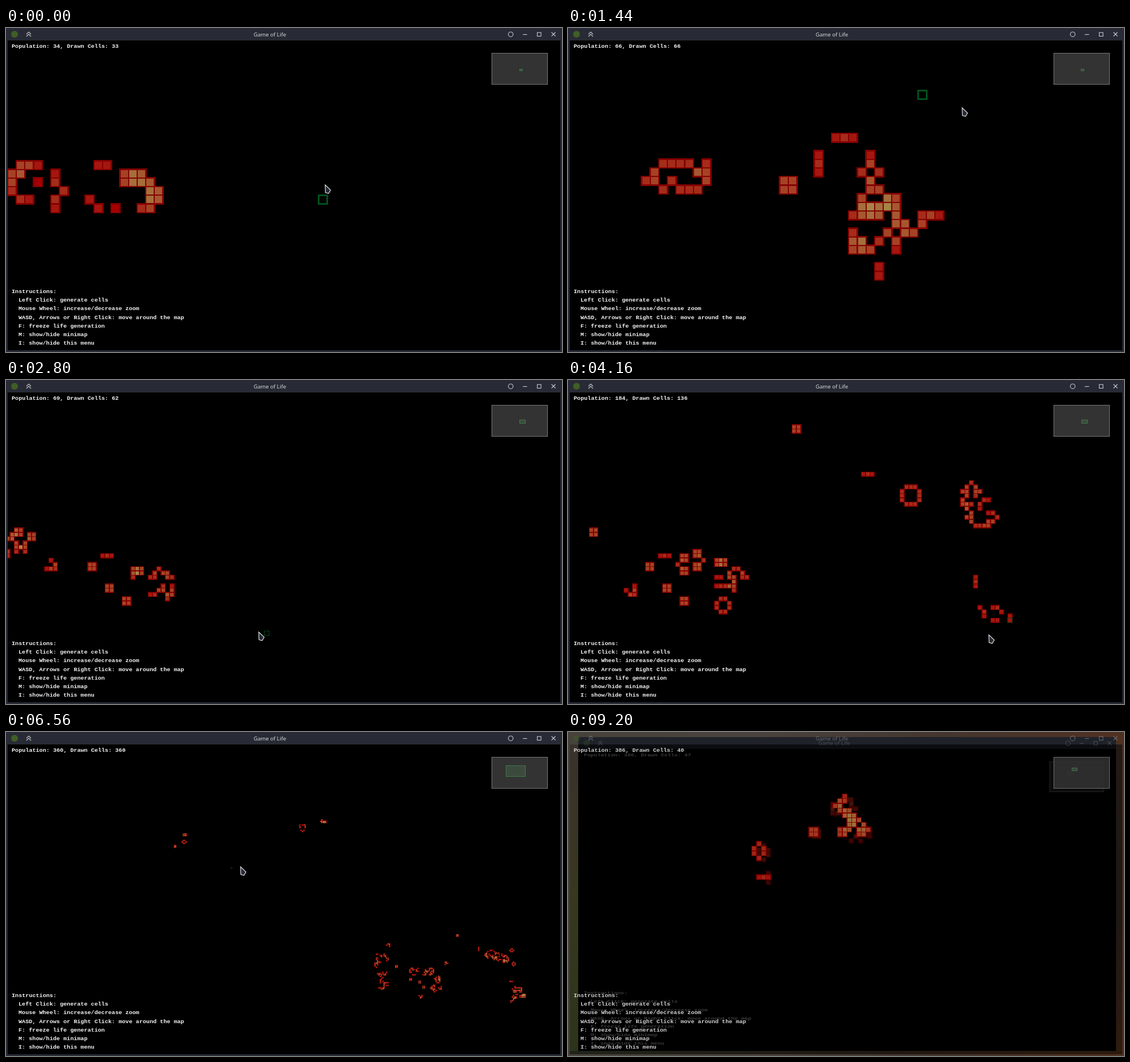
These frames come from a looping animation (979 by 572 pixels, 9280 ms). An HTML page with a canvas:

```html
<!DOCTYPE html>
<html lang="en">
<head>
<meta charset="utf-8">
<title>Game of Life</title>
<style>
html, body { margin: 0; width: 100%; height: 100%; overflow: hidden; background: #000; }
canvas { display: block; }
</style>
</head>
<body>
<canvas id="stage" width="979" height="572"></canvas>
<script>
const ctx = document.getElementById('stage').getContext('2d');
const STEP = 80, LOOP = 9280, LAST = LOOP - STEP;

// --- Life ---
const id = (x, y) => (y + 2048) * 4096 + x + 2048;
const cellX = k => k % 4096 - 2048;
const cellY = k => Math.floor(k / 4096) - 2048;
const AROUND = [-4097, -4096, -4095, -1, 1, 4095, 4096, 4097];

function nextGen(cells) {
  const count = new Map(), out = new Set();
  for (const k of cells) for (const d of AROUND) count.set(k + d, (count.get(k + d) || 0) + 1);
  for (const [k, n] of count) if (n === 3 || (n === 2 && cells.has(k))) out.add(k);
  return out;
}

function evolve(cells, n) {
  for (let i = 0; i < n; i++) cells = nextGen(cells);
  return cells;
}

const BLOCK = 'OO/OO', ROW = 'OOO', COLUMN = 'O/O/O';

function put(cells, x, y, shape) {
  shape.split('/').forEach((row, j) => {
    [...row].forEach((ch, i) => { if (ch === 'O') cells.add(id(x + i, y + j)); });
  });
}

let seed = 7;
const random = () => (seed = seed * 16807 % 2147483647) / 2147483647;

// Random cells in a round brush dragged along a line.
function scribble(cells, x1, y1, x2, y2, r) {
  const n = Math.ceil(Math.hypot(x2 - x1, y2 - y1) * r * 2);
  for (let i = 0; i < n; i++) {
    const k = i / n, a = random() * 2 * Math.PI, d = random() * r;
    cells.add(id(Math.round(x1 + (x2 - x1) * k + d * Math.cos(a)), Math.round(y1 + (y2 - y1) * k + d * Math.sin(a))));
  }
}

// What the user draws, by time; everything else grows from it.
const PAINT = {
  0(c) {
    put(c, -2, 5, '.OOO......OO/OO...O.......OOO/O..O.O.......OOOO/O.....O.........OO/.OO..O...O......OO/.....O....O.O..OO');
  },
  1440(c) {
    c.clear();
    put(c, -3, 6, '..OOOO.O/.O....OO/OO.O...O/..O.OOO');
    put(c, 13, 8, BLOCK);
    put(c, 19, 3, ROW);
    put(c, 17, 5, COLUMN);
    put(c, 21, 5, '..O/..O/.O.O/..O/..OO/.O..OO/.OOOOO/OOOO.O..OOO/.....OO.O/O...O.OO/OO.O.O/OOO..O//...O/...O');
  },
  3200(c) { put(c, 47, -24, BLOCK); },
  3280(c) { put(c, 63, -13, ROW); },
  4160(c) {
    put(c, 72, -10, '.OOO/O...O/O...O/O...O/.OOO');
    put(c, 86, -11, '..O/.O.O/OO.OO/.O.O/O....OO/OOO.O/.O..O/..O...OO/.OO.....O/..O...OO/...OOOO');
    put(c, 89, 11, COLUMN);
    put(c, 90, 18, 'O..OO/.O...O/.O.....O/...OO..O');
  },
  6240(c) {
    scribble(c, -179, -91, -163, -99, 3);
    scribble(c, -74, -107, -70, -107, 3);
    scribble(c, -57, -114, -50, -114, 3);
  },
  8240(c) {
    c.clear();
    put(c, -158, -103, '.OOO/.OOO/O...OO/O.O.OO/.O..OO/..OO');
    put(c, -161, -99, BLOCK);
    put(c, -166, -97, BLOCK);
    put(c, -178, -94, '.O/O.O/O.O/.O');
    put(c, -176, -88, COLUMN);
  }
};

const generation = t => Math.floor(t / 62.5 + 0.18);

function simulate() {
  const frames = [];
  let cells = new Set();
  for (let t = 0; t < LOOP; t += STEP) {
    cells = new Set(evolve(cells, generation(t) - generation(t - STEP)));
    if (PAINT[t]) PAINT[t](cells);
    frames.push(cells);
  }
  return frames;
}
const FRAMES = simulate();

// --- Motion: cell 0,0 on screen, pointer tip, aim relative to the tip, counters ---
const KEYS = [
  { t: 0, pitch: 15.2, origin: [40.9, 166], tip: [562, 277], aim: [-4, 26], count: [34, 33] },
  { t: 1440, pitch: 15.2, origin: [182.7, 148.2], tip: [694, 141], aim: [-71, -24], count: [66, 66] },
  { t: 2800, pitch: 7.6, origin: [48.8, 264.9], tip: [445, 445], aim: [14, 2], count: [69, 62] },
  { t: 4160, pitch: 7.6, origin: [41.2, 264.9], tip: [741, 450], aim: [37, -26], count: [184, 136] },
  { t: 6560, pitch: 2.28, origin: [686.4, 412.9], tip: [413, 238], aim: [-16, 2], count: [360, 360] },
  { t: 8240, pitch: 8.38, origin: [1819.5, 985.1], tip: [495, 305], aim: [17, 9], count: [385, 35] },
  { t: 9200, pitch: 8.38, origin: [1819.5, 985.1], tip: [960, 8], aim: [17, 9], count: [386, 40] }
];
const MIDDLE = [489.5, 295];
const mix = (a, b, k) => a + (b - a) * k;
const mixPair = (a, b, k) => a.map((v, i) => mix(v, b[i], k));
const center = key => key.origin.map((o, i) => (MIDDLE[i] - o) / key.pitch);

function ease(k) {
  const s = Math.min(1, Math.max(0, (k - 0.05) / 0.6));
  return s * s * (3 - 2 * s);
}

function poseAt(t) {
  let i = KEYS.length - 1;
  while (i > 0 && KEYS[i].t > t) i--;
  const a = KEYS[i], b = KEYS[i + 1] || a;
  const k = a === b ? 0 : (t - a.t) / (b.t - a.t), e = ease(k);
  const p = Math.exp(mix(Math.log(a.pitch), Math.log(b.pitch), e));
  const [cx, cy] = mixPair(center(a), center(b), e);
  const view = { p, x: MIDDLE[0] - cx * p, y: MIDDLE[1] - cy * p };
  const tip = mixPair(a.tip, b.tip, k), off = mixPair(a.aim, b.aim, k);
  tip[1] -= 0.7 * Math.min(a.tip[1], b.tip[1]) * Math.sin(Math.PI * k);
  const aim = [Math.round((tip[0] + off[0] - view.x) / p), Math.round((tip[1] + off[1] - view.y) / p)];
  return { view, tip, aim, count: mixPair(a.count, b.count, k).map(Math.round) };
}

// --- Drawing ---
function box(x, y, w, h, color) {
  ctx.fillStyle = color;
  ctx.fillRect(x, y, w, h);
}

function outline(x, y, w, h, color) {
  ctx.strokeStyle = color;
  ctx.lineWidth = 1;
  ctx.strokeRect(x + 0.5, y + 0.5, w - 1, h - 1);
}

function path(points, close) {
  ctx.beginPath();
  points.forEach(([x, y]) => ctx.lineTo(x, y));
  if (close) ctx.closePath();
}

function drawCells(cells, v) {
  const rim = v.p * 0.17, full = Math.round(v.p + rim), core = Math.round(v.p - rim);
  const seen = [];
  for (const k of cells) {
    const x = v.x + cellX(k) * v.p, y = v.y + cellY(k) * v.p;
    if (x > -10 && x < 990 && y > 10 && y < 585) seen.push([k, x, y]);
  }
  for (const [, x, y] of seen) box(Math.round(x - full / 2), Math.round(y - full / 2), full, full, '#840000');
  for (const [k, x, y] of seen) {
    const n = AROUND.filter(d => cells.has(k + d)).length;
    box(Math.round(x - core / 2), Math.round(y - core / 2), core, core, `rgb(165,${22 * n},${4 + 11 * n})`);
  }
}

function drawAim([x, y], v) {
  const s = Math.round(v.p);
  ctx.strokeStyle = v.p < 4 ? '#0c2c18' : '#00501e';
  ctx.lineWidth = Math.max(1, Math.round(v.p * 0.17));
  ctx.strokeRect(Math.round(v.x + x * v.p) - s / 2, Math.round(v.y + y * v.p) - s / 2, s, s);
}

function drawMinimap(v) {
  const x = Math.round(903.7 + ((3 - v.x) / v.p + 5) / 12.55);
  const y = Math.round(70 + ((22 - v.y) / v.p + 32) / 12.55);
  const w = Math.round(77.5 / v.p) + 1, h = Math.round(43.6 / v.p) + 1;
  box(855, 44, 99, 56, '#333');
  outline(855, 44, 99, 56, '#777');
  box(x, y, w, h, '#3c4a3e');
  outline(x, y, w, h, '#3f7848');
}

const HELP = ['Left Click: generate cells', 'Mouse Wheel: increase/decrease zoom',
  'WASD, Arrows or Right Click: move around the map', 'F: freeze life generation',
  'M: show/hide minimap', 'I: show/hide this menu'];

// The console face is low and wide.
function say(s, x, y) {
  ctx.save();
  ctx.translate(x, y);
  ctx.scale(1, 0.82);
  ctx.fillText(s, 0, 0);
  ctx.restore();
}

function drawText([pop, drawn]) {
  ctx.font = 'bold 10.13px "Liberation Mono", monospace';
  ctx.textAlign = 'left';
  ctx.fillStyle = '#f4f4f4';
  say(`Population: ${pop}, Drawn Cells: ${drawn}`, 10, 35);
  say('Instructions:', 10, 468);
  HELP.forEach((s, i) => say(s, 22, 483.2 + i * 15.2));
}

function drawTitle() {
  ctx.fillStyle = '#3f5f26';
  ctx.beginPath();
  ctx.arc(15, 11, 6, 0, 7);
  ctx.fill();
  ctx.font = '9.65px "Noto Sans", sans-serif';
  ctx.textAlign = 'center';
  ctx.fillStyle = '#d3d6da';
  ctx.fillText('Game of Life', 464.5, 15);
  ctx.strokeStyle = '#c8ccd0';
  ctx.lineWidth = 1.1;
  for (const y of [11, 15]) { path([[36, y], [40, y - 4], [44, y]]); ctx.stroke(); }
  ctx.beginPath();
  ctx.arc(888.7, 11.2, 4.2, 0, 7);
  ctx.stroke();
  path([[910, 11.5], [917.5, 11.5]]);
  ctx.stroke();
  ctx.strokeRect(935.5, 8, 6.5, 6.5);
  for (const s of [-3.5, 3.5]) { path([[964 - s, 7.5], [964 + s, 14.5]]); ctx.stroke(); }
}

function drawPointer([x, y]) {
  path([[0, 0], [0.5, 13.5], [6, 15], [9.5, 9]].map(([a, b]) => [x + a, y + b]), true);
  ctx.fillStyle = '#282c36';
  ctx.strokeStyle = '#dfe2e6';
  ctx.lineWidth = 1.2;
  ctx.fill();
  ctx.stroke();
}

function drawWindow(t, cells) {
  const { view, tip, aim, count } = poseAt(t);
  box(0, 0, 979, 572, '#282b35');
  box(3, 22, 973, 547, '#000');
  ctx.save();
  ctx.beginPath();
  ctx.rect(3, 22, 973, 547);
  ctx.clip();
  drawCells(cells, view);
  drawAim(aim, view);
  drawMinimap(view);
  drawText(count);
  ctx.restore();
  drawTitle();
  drawPointer(tip);
}

function shade(x, y, w, h, colors) {
  const g = ctx.createLinearGradient(x, y, w > h ? x + w : x, w > h ? y : y + h);
  colors.forEach((c, i) => g.addColorStop(i / (colors.length - 1), c));
  box(x, y, w, h, g);
}

// The window shrinks and fades over the desktop.
function drawClosing(t, cells) {
  const { view, count } = poseAt(t);
  shade(0, 0, 979, 572, ['#46413b', '#4a423e', '#43362f', '#503021']);
  shade(3, 22, 15, 547, ['#38322c', '#38371f', '#2b341b']);
  shade(965, 22, 11, 547, ['#241a18', '#1d1715', '#2e1c10']);
  box(18, 9, 947, 21, '#1f2229');
  box(18, 22, 947, 8, '#0c0d10');
  box(18, 30, 947, 533, '#000');
  shade(3, 563, 973, 6, ['#20241a', '#1f1813', '#2c1a0e']);

  ctx.save();
  ctx.globalAlpha = 0.24;
  ctx.transform(0.97, 0, 0, 0.971, 18.3, 8.9);
  drawTitle();
  drawCells(evolve(cells, 3), view);
  drawMinimap(view);
  drawText([396, 47]);
  ctx.restore();

  ctx.save();
  ctx.globalAlpha = 0.4;
  drawTitle();
  ctx.globalAlpha = 0.85;
  drawCells(cells, view);
  drawMinimap(view);
  drawText(count);
  ctx.restore();
}

function render(now) {
  const i = Math.floor(now % LOOP / STEP), t = i * STEP;
  (t === LAST ? drawClosing : drawWindow)(t, FRAMES[i]);
}

const start = performance.now();
function loop() {
  render(performance.now() - start);
  requestAnimationFrame(loop);
}
loop();
</script>
</body>
</html>
```
